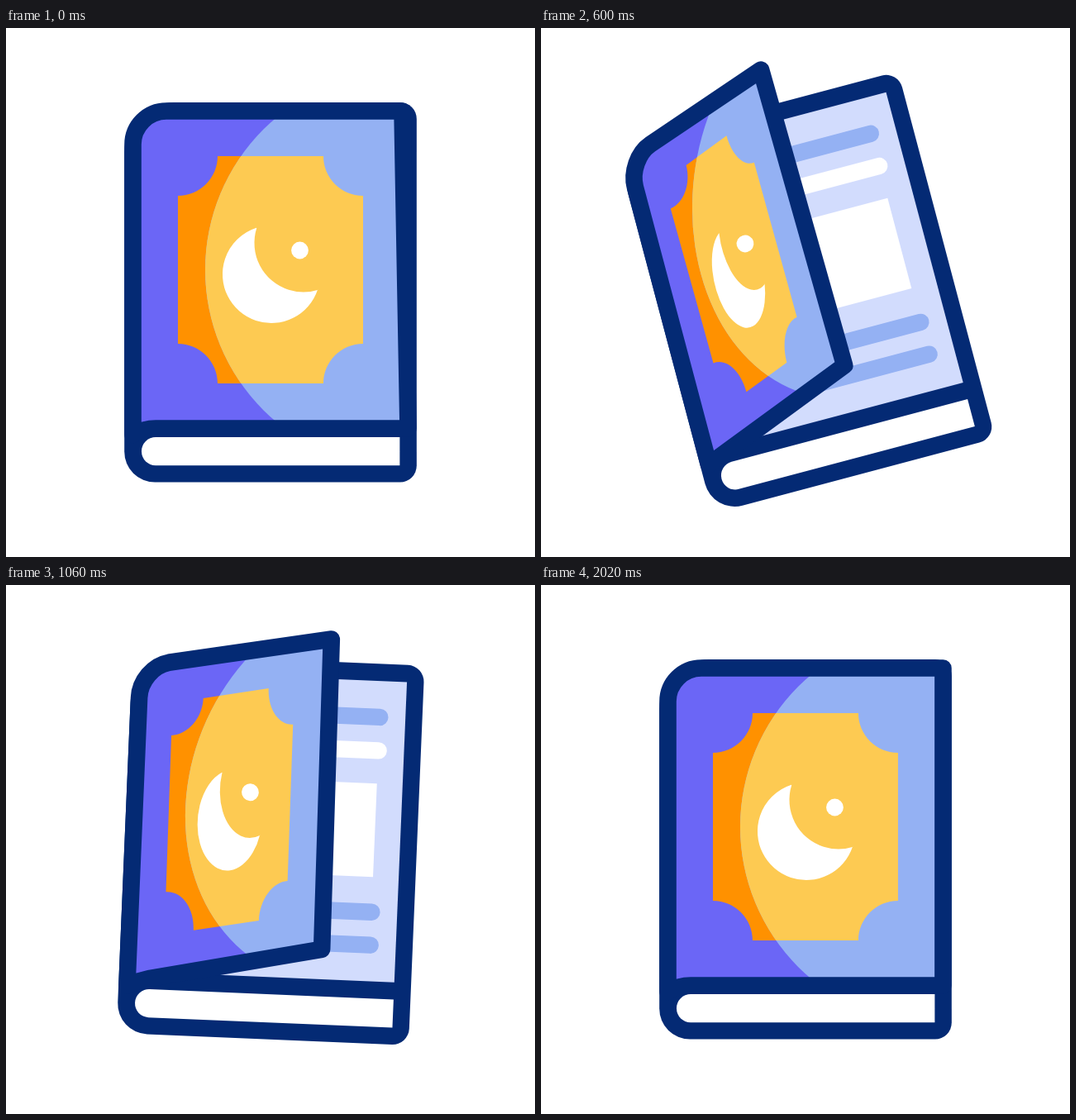
Animation of 640 by 640 pixels, one loop 2.4 s. Source, as an HTML page with a canvas:

```html
<!DOCTYPE html>
<html lang="en">
<head>
<meta charset="utf-8">
<title>Opening book</title>
<style>
  html, body { margin: 0; width: 100%; height: 100%; overflow: hidden; background: #fff; }
  canvas { display: block; }
</style>
</head>
<body>
<canvas id="stage" width="640" height="640"></canvas>
<script>
const ctx = document.getElementById('stage').getContext('2d');
const LOOP = 2400;
const NAVY = '#042a74', PURPLE = '#6b66f6', BLUE = '#94b1f3', PAGE = '#d2dcfd',
      ORANGE = '#ff9100', YELLOW = '#fdca52', WHITE = '#fff';
const TURNS = [0, 553, 897, 1240, 1540, 1880]; // moments when the rocking reverses

const mix = (a, b, k) => a + (b - a) * k;
const clamp = p => Math.min(1, Math.max(0, p));
const smooth = p => (1 - Math.cos(Math.PI * clamp(p))) / 2;
const toward = (a, b) => [mix(a[0], b[0], .552), mix(a[1], b[1], .552)];

// Each swing is half the one before and goes the other way; the book ends upright.
const swing = i => i > 0 && i < TURNS.length - 1 ? -16 * (-.5) ** (i - 1) : 0;

function rockAngle(t) {
  const i = TURNS.findIndex(turn => turn > t);
  if (i < 0) return 0;
  const p = (t - TURNS[i - 1]) / (TURNS[i] - TURNS[i - 1]);
  return mix(swing(i - 1), swing(i), smooth(p));
}

function openness(t) {
  if (t < 720) return smooth(t / 430);
  const p = clamp((t - 720) / 1320);
  return 1 - (p + p * p - p * p * p);
}

// A point on the cover, from its closed place to its open place.
const morph = (x0, y0, x1, y1, k) => [mix(x0, x1, k), mix(y0, y1, k)];

function coverPath(k, topRightX) {
  const path = new Path2D();
  const side = morph(153.5, 141, 153.5, 144, k);
  const corner = morph(153.5, 100.5, 153.5, 109.5, k);
  const top = morph(194, 100.5, 184.6, 98.6, k);
  const foot = morph(153.5, 492, 153.5, 491.3, k);
  path.moveTo(...foot);
  path.lineTo(...side);
  path.bezierCurveTo(...toward(side, corner), ...toward(top, corner), ...top);
  path.lineTo(...morph(topRightX, 100.5, 337, 45.8, k));
  path.lineTo(...morph(486.5, 484.5, 343, 417.4, k));
  path.lineTo(...morph(181, 484.5, 181, 480.6, k));
  path.quadraticCurveTo(...morph(167, 484.5, 167, 486, k), ...foot);
  path.closePath();
  return path;
}

function badgePath(k) {
  const path = new Path2D();
  for (const [sx, sy] of [[-1, -1], [1, -1], [1, 1], [-1, 1]]) {
    const side = morph(320 + 112 * sx, 292.5 + 89.5 * sy,
      245.3 + 56 * sx + sy, 263 - 14 * sx + 97 * sy, k);
    const end = morph(320 + 64 * sx, 292.5 + 137.5 * sy,
      248.2 + 28.2 * sx, 265 - 11 * sx + 142 * sy, k);
    const bend = [end[0], side[1] - .15 * k * (end[0] - side[0])];
    const [a, b] = sx === sy ? [side, end] : [end, side];
    path.lineTo(...a);
    path.bezierCurveTo(...toward(a, bend), ...toward(b, bend), ...b);
  }
  path.closePath();
  return path;
}

// Places a shape drawn around (0, 0): unscaled at (x, y) when closed, skewed when open.
function warp(x, y, [a, b, c, d, e, f], k) {
  return new DOMMatrix([mix(1, a, k), mix(0, b, k), mix(0, c, k), mix(1, d, k),
    mix(x, e, k), mix(y, f, k)]);
}

function warped(shape, matrix) {
  const path = new Path2D();
  path.addPath(shape, matrix);
  return path;
}

function circle(x, y, r) {
  const path = new Path2D();
  path.arc(x, y, r, 0, 2 * Math.PI);
  return path;
}

const shine = circle(0, 0, 240);
const moon = new Path2D();
moon.arc(0, 0, 59, .322, 4.4);
moon.arc(39, -38, 59.5, 3.448, 1.265, true);

function fill(color, path) {
  ctx.fillStyle = color;
  ctx.fill(path);
}

function box(color, x, y, w, h, radii = 0) {
  const path = new Path2D();
  path.roundRect(x, y, w, h, radii);
  fill(color, path);
}

function drawBody() {
  box(NAVY, 143.2, 90, 353.6, 459.5, [60, 20, 20, 37]);
  box(PAGE, 164, 110.8, 312.4, 363.4);
  for (const y of [154.5, 195, 390.5, 430.5])
    box(y === 195 ? WHITE : BLUE, 185, y - 10.2, 270.7, 20.4, 10.2);
  box(WHITE, 195, 235, 250.3, 113);
  box(WHITE, 164, 495, 312.4, 34.2, [17, 0, 0, 17]);
}

function drawCover(k, topRightX) {
  const cover = coverPath(k, topRightX), badge = badgePath(k);
  fill(PURPLE, cover);
  fill(ORANGE, badge);
  ctx.save();
  ctx.clip(warped(shine, warp(481, 292.5, [.83, -.25, .05, .975, 403, 218], k)));
  fill(BLUE, cover);
  fill(YELLOW, badge);
  ctx.restore();
  fill(WHITE, warped(moon, warp(321, 298, [.51, -.07, 0, 1.05, 246.4, 281.5], k)));
  fill(WHITE, circle(...morph(355.5, 269, 264.6, 244.2, k), 10.4));
  ctx.strokeStyle = NAVY;
  ctx.lineWidth = 20.6;
  ctx.lineJoin = 'round';
  ctx.stroke(cover);
}

function draw(t) {
  ctx.fillStyle = WHITE;
  ctx.fillRect(0, 0, 640, 640);
  ctx.save();
  ctx.translate(320, 320);
  ctx.rotate(rockAngle(t) * Math.PI / 180);
  ctx.translate(-320, -320);
  drawBody();
  // The cover starts with its top corner pulled in a little and ends flush.
  drawCover(openness(t), t < 600 ? 479.5 : 486.5);
  ctx.restore();
}

const start = performance.now();
function tick() {
  draw((performance.now() - start) % LOOP);
  requestAnimationFrame(tick);
}
tick();
</script>
</body>
</html>
```
